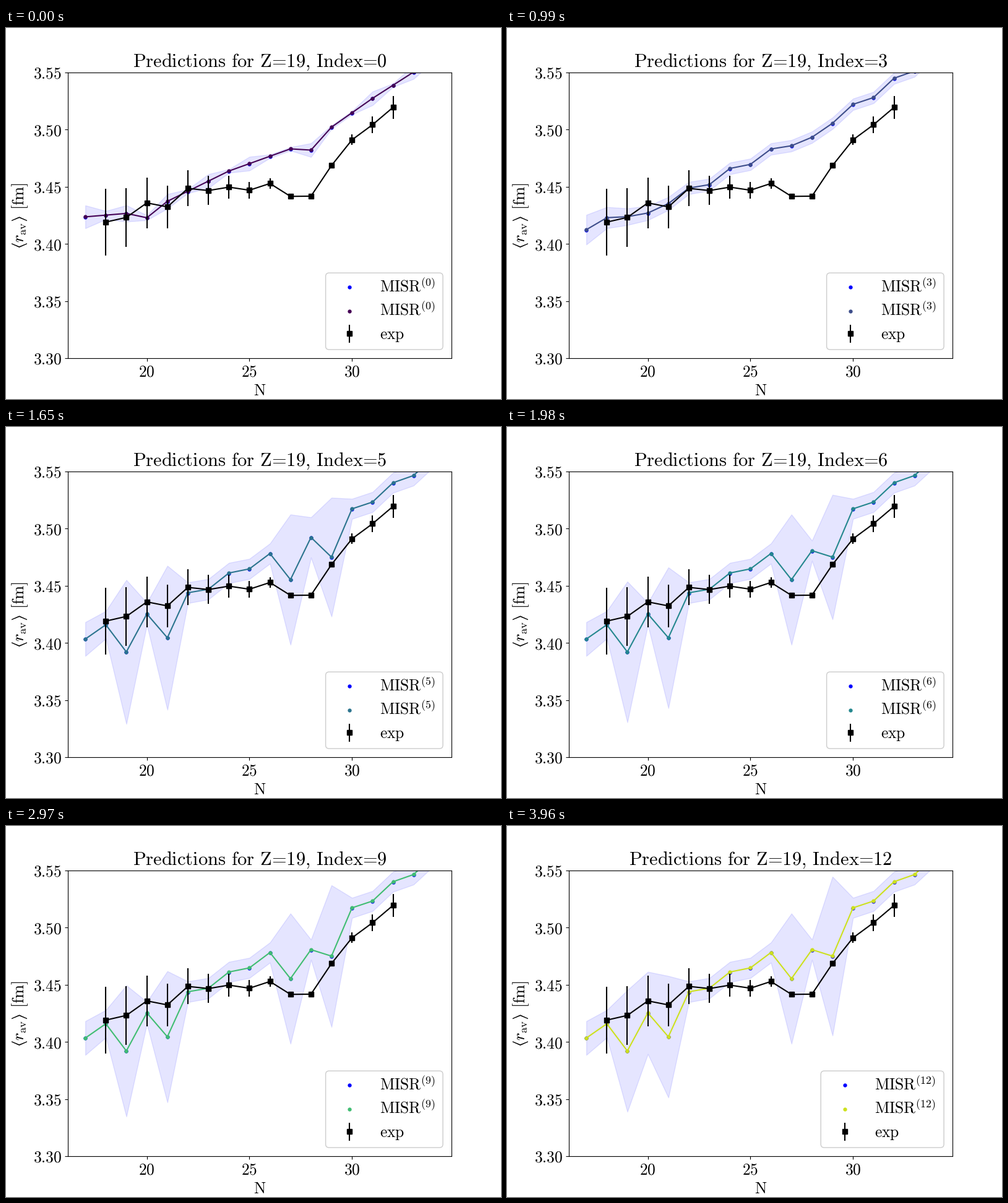
A matplotlib script that plays this animation: 800 px wide and 600 px high, repeating every 4.29 s.

```python
import numpy as np
import matplotlib.pyplot as plt
from matplotlib.animation import FuncAnimation
from matplotlib.patches import FancyBboxPatch
from matplotlib.transforms import Affine2D, IdentityTransform

plt.rcParams["mathtext.fontset"] = "cm"

COUNT, STEP = 13, 330
SIZE, TITLE_SIZE, YLABEL_SIZE = 18.4, 21.9, 19.2
DOT = 7

# Radii are in 1e-3 fm above 3.4 fm.
N = np.arange(17, 35)
ODD = N % 2 == 1
MAGIC = np.isin(N, [20, 28])
BESIDE = np.isin(N, [19, 21, 27, 29])
EDGE = np.exp(-(N - 17) / 1.6)

# First fit: straight pieces with kinks at the magic numbers
FIRST = np.interp(N, [17, 19, 20, 21, 24, 27, 28, 29, 31, 33, 34],
                  [23.9, 26.9, 23.1, 37.5, 64, 83.4, 82.3, 102.4, 127.6, 150.6, 162])
FIRST_STD = 1.5 + 4.5 * (ODD ^ (abs(N - 28) <= 1)) + 4 * EDGE

# Later fits: smooth trend with even-odd staggering
TREND = np.interp(N, np.arange(17, 36, 2),
                  [7.4, 21.8, 34.2, 51, 68.8, 85.1, 104.8, 127.3, 150.5, 173])
TREND += np.where(ODD, 0, np.where(MAGIC, -2.4, 5.3))

EXP_N = np.arange(18, 33)
EXP = np.array([19.3, 23.4, 36.1, 32.6, 48.8, 46.9, 49.9, 47.2, 53.1,
                41.8, 42, 68.8, 91.3, 104.5, 119.7])
EXP_DIST = abs(EXP_N - 28)
EXP_ERR = 2.15 * EXP_DIST + 0.077 * EXP_DIST ** 2


def fm(values):
    return 3.4 + (values - 0.2) / 1000


def early(i):
    """Smooth curve sinking until index 4, starting from the first fit."""
    sink = np.clip((4 - i) / 2, 0, 1)
    w = max(0, 1 - i / 2)
    mean = w * FIRST + (1 - w) * (TREND + sink * (2 + 8.5 * EDGE))
    std = w * FIRST_STD + (1 - w) * (5 + 8 * EDGE)
    return mean, std


def late(i):
    """Unstable curve: deep dips and wide spread beside the magic numbers."""
    t = i - 5
    mean = TREND - np.where(BESIDE, 29.5, np.where(MAGIC, 0, 3.8))
    left, right = 63 - 1.4 * t, 57 + (N - 27) * (1.25 * t - 2.5)
    std = np.where(BESIDE, np.where(N < 24, left, right), 8.8 + 6 * EDGE)
    if t > 0:
        mean[N == 28] -= 11.6
    else:
        std[N == 28] *= 2
    if t >= 5:
        std[N == 20] *= 3.7
    return mean, std


def tex(s):
    return rf"$\text{{{s}}}$"


fig, ax = plt.subplots(figsize=(8, 6), dpi=100)
fig.subplots_adjust(left=0.125, right=0.9, bottom=0.11, top=0.88)

# Model curves, redrawn at each index
blue, = ax.plot([], [], ".", color="blue", ms=DOT)
model, = ax.plot([], [], ".-", lw=1.5, ms=DOT)
bands = []

# Measured radii
ax.errorbar(EXP_N, fm(EXP), yerr=EXP_ERR / 1000, fmt="s-", color="black",
            lw=1.5, ms=6, elinewidth=1.5, zorder=3)

# Legend, laid out in pixels
BOX_X, BOX_W = 516.6, 189.5
shift = Affine2D()
box = FancyBboxPatch((BOX_X, 79.9), BOX_W, 124, transform=IdentityTransform(),
                     boxstyle="round,pad=0,rounding_size=5.56",
                     fc="white", ec="0.8", lw=1, zorder=5)
ax.add_patch(box)


def legend_mark(y, color, marker=".", ms=DOT, half=0):
    return ax.plot([555.2] * 3, [y - half, y, y + half], marker=marker, ms=ms,
                   markevery=[1], color=color, lw=1.5, transform=shift,
                   zorder=6)[0]


def legend_text(y, s=""):
    return ax.text(603.8, y, s, size=SIZE, transform=shift, zorder=6)


legend_mark(180.6, "blue")
model_mark = legend_mark(142.4, "blue")
legend_mark(105.6, "black", "s", 6, 13.9)
names = [legend_text(173.8), legend_text(135.4)]
legend_text(97, tex("exp"))

# Axes
ax.set_xlim(16.15, 34.85)
ax.set_ylim(3.30, 3.55)
xt, yt = [20, 25, 30], np.linspace(3.30, 3.55, 6)
ax.set_xticks(xt, [tex(v) for v in xt], size=SIZE)
ax.set_yticks(yt, [tex(f"{v:.2f}") for v in yt], size=SIZE)
ax.set_xlabel(tex("N"), size=SIZE, labelpad=3)
ax.set_ylabel(r"$⟨r_{\mathrm{av}}⟩\text{ [fm]}$", size=YLABEL_SIZE)
title = ax.set_title("", size=TITLE_SIZE, pad=6.6)


def draw(i):
    mean, std = early(i) if i < 5 else late(i)
    color = plt.cm.viridis(i / COUNT)

    while bands:
        bands.pop().remove()
    bands.append(ax.fill_between(N, fm(mean - std), fm(mean + std),
                                 color="blue", alpha=0.1))
    blue.set_data(N, fm(mean - 0.3))
    model.set_data(N, fm(mean))
    model.set_color(color)
    model_mark.set_color(color)

    dx = -9.4 if i >= 10 else 0
    shift.clear().translate(dx, 0)
    box.set_x(BOX_X + dx)
    box.set_width(BOX_W - dx)
    for name in names:
        name.set_text(rf"$\mathrm{{MISR}}^{{\mathrm{{({i})}}}}$")
    title.set_text(tex(f"Predictions for Z=19, Index={i}"))
    return []


anim = FuncAnimation(fig, draw, frames=COUNT, init_func=lambda: [],
                     interval=STEP, repeat=True, repeat_delay=0, blit=False)
plt.show()
```
